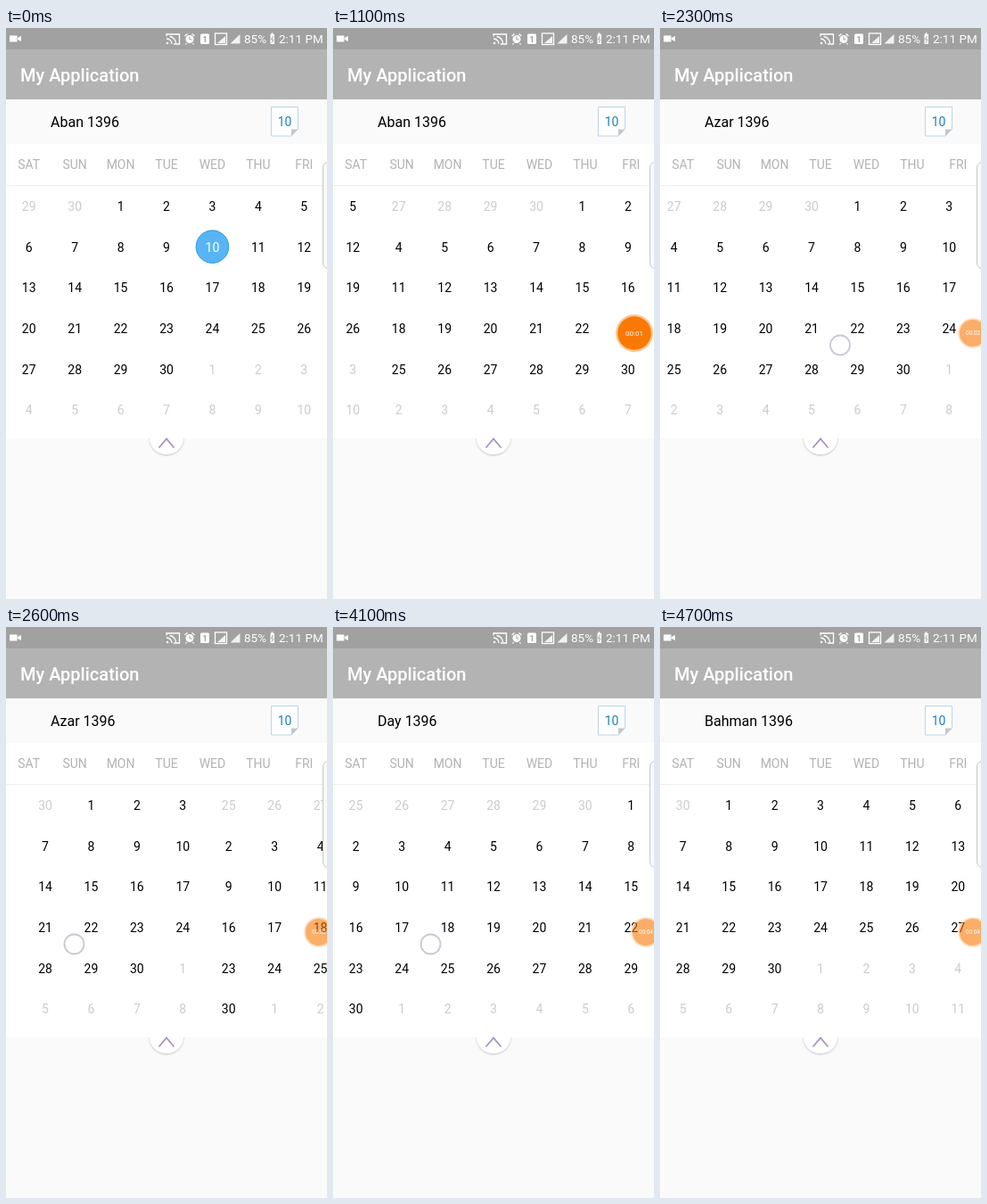
An HTML page that plays this animation: 360 by 640 pixels, repeating every 5 s.

```html
<!DOCTYPE html>
<html lang="en">
<head>
<meta charset="utf-8">
<title>Month calendar</title>
<style>
  html, body { margin: 0; width: 100%; height: 100%; overflow: hidden; background: #fafafa; }
  svg { display: block; width: 100%; height: 100%; font-family: Roboto, sans-serif; }
  .mid { text-anchor: middle; }
</style>
</head>
<body>
<svg viewBox="0 0 360 640">
  <defs>
    <filter id="soft" x="-30%" y="-30%" width="160%" height="160%">
      <feDropShadow dx="0" dy="1" stdDeviation="1" flood-opacity=".25"/>
    </filter>
  </defs>
  <rect width="360" height="640" fill="#fafafa"/>

  <!-- collapse tab -->
  <circle cx="180" cy="459" r="19" fill="#fff" filter="url(#soft)"/>
  <rect y="130" width="360" height="330" fill="#fff"/>
  <path d="M171.500 470.500L180 460.500L188.500 470.500" fill="none" stroke="#a994c4" stroke-width="1.800"/>

  <g id="weekdays" class="mid" font-size="14" fill="#b3b3b3"></g>
  <path d="M0 176.500H356" stroke="#eee"/>
  <g id="strip" class="mid" font-size="14"></g>

  <!-- title bar and status bar -->
  <rect width="360" height="24" fill="#a1a1a1"/>
  <rect y="24" width="360" height="56" fill="#b3b3b3"/>
  <text x="16" y="59.500" font-size="20" font-weight="500" fill="#fff">My Application</text>
  <g fill="#fff">
    <path d="M4 8.500h8.500v7H4zM13 11l4-2v6l-4-2z"/>
    <rect x="218" y="6.500" width="10" height="11.500" rx="1.500"/>
    <path d="M246 9v8h-9zM262.500 7v10.500h-11z" fill-opacity=".85"/>
    <path d="M296.500 7h1v-1.500h2V7h1.500v11h-4.500z"/>
    <circle cx="206" cy="12.500" r="4.500"/>
    <circle cx="181" cy="17" r="1.300"/>
    <text x="267" y="17" font-size="13.500">85%</text>
    <text x="306" y="17" font-size="13.500">2:11 PM</text>
  </g>
  <g fill="none" stroke="#fff" stroke-width="1.300">
    <path d="M180 9.500V7h14.500v11H188M180 12a6 6 0 0 1 6 6M183.500 9.500a8 8 0 0 1 7 7.500"/>
    <rect x="234.500" y="6" width="13" height="12.500"/>
    <path d="M200.500 9l3-2.500M211.500 9l-3-2.500M202.500 17l-1 1.500M209.500 17l1 1.500"/>
  </g>
  <path d="M206 9.500v3.500h2.500M299.500 9l-2 4h2.500l-2 3.500" fill="none" stroke="#a1a1a1"/>
  <text class="mid" x="223" y="15.800" font-size="9" font-weight="700" fill="#a1a1a1">1</text>

  <!-- month heading and today button -->
  <text id="month" x="50" y="110.500" font-size="16"></text>
  <path d="M297.500 88.500H327.500V113L320 121H297.500Z" fill="#fff" stroke="#bcd6e4"/>
  <path d="M320 113.500h7.500l-7.500 7.500z" fill="#c4c8ca"/>
  <text class="mid" x="312.500" y="109.500" font-size="14" fill="#1a80c0">10</text>

  <!-- edge handle -->
  <path d="M361 150.500Q355.500 151 355.500 157V263Q355.500 269 361 269.500Z" fill="#f9f9f9" stroke="#c8c8c8"/>

  <g id="recorder">
    <circle r="21" fill="#fbc892"/>
    <circle r="18.800" fill="#f97904"/>
    <text id="clock" class="mid" y="2.800" font-size="8" fill="#fff"></text>
  </g>
  <circle id="touch" r="11" fill="#fff" fill-opacity=".65" stroke="#c9c9d4" stroke-width="1.800"/>
</svg>

<script>
const $ = id => document.getElementById(id);
const LOOP = 5000, STEP = 100, WIDTH = 360, COLUMN = WIDTH / 7, ROW = 45.67;

const months = [
  { name: 'Aban', firstColumn: 2, from: 0, selected: 10 },
  { name: 'Azar', firstColumn: 4, from: 1600 },
  { name: 'Day', firstColumn: 6, from: 3200 },
  { name: 'Bahman', firstColumn: 1, from: 4700 }
];

// Keys are [time in ms, value].
const scrollKeys = [
  [700, 0], [800, 25], [900, 100], [1000, 235], [1100, 312], [1200, 343], [1300, 356], [1400, 360],
  [2200, 360], [2300, 370], [2600, 496], [2700, 702], [2800, 714], [2900, 719], [3000, 720],
  [4100, 720], [4200, 785], [4300, 970], [4400, 1063], [4500, 1080]
];
const touches = [
  [[700, 240], [800, 210], [900, 135]],
  [[2200, 224], [2300, 202], [2600, 76.5]],
  [[4100, 109.5], [4200, 45]]
];
const clockTicks = [900, 2200, 2900, 4100];

function sample(keys, t) {
  const next = keys.findIndex(([time]) => time > t);
  if (next === 0) return keys[0][1];
  if (next < 0) return keys[keys.length - 1][1];
  const [t0, a] = keys[next - 1], [t1, b] = keys[next];
  return a + (b - a) * (t - t0) / (t1 - t0);
}

function add(parent, tag, attributes, text = '') {
  const node = document.createElementNS('http://www.w3.org/2000/svg', tag);
  for (const key in attributes) node.setAttribute(key, attributes[key]);
  node.textContent = text;
  parent.append(node);
}

const columnX = column => (column + 0.5) * COLUMN;

function buildMonth({ firstColumn, selected }, page) {
  for (let cell = 0; cell < 42; cell++) {
    const index = cell - firstColumn;
    const day = (index + 30) % 30 + 1;
    const inMonth = index >= 0 && index < 30;
    const isSelected = inMonth && day === selected;
    const x = page * WIDTH + columnX(cell % 7);
    const y = 200 + Math.floor(cell / 7) * ROW;
    if (isSelected) add($('strip'), 'circle', { cx: x, cy: y - 0.5, r: 18.3, fill: '#58b5f5', stroke: '#2b98e0' });
    add($('strip'), 'text', { x, y: y + 5, fill: isSelected ? '#fff' : inMonth ? '#000' : '#ccc' }, day);
  }
}

['SAT', 'SUN', 'MON', 'TUE', 'WED', 'THU', 'FRI'].forEach((name, column) =>
  add($('weekdays'), 'text', { x: columnX(column), y: 157.5 }, name));
months.forEach(buildMonth);

function draw(now) {
  const t = Math.floor(now % LOOP / STEP) * STEP;
  $('strip').setAttribute('transform', `translate(${-sample(scrollKeys, t)} 0)`);
  $('month').textContent = months.filter(month => t >= month.from).pop().name + ' 1396';

  const docked = t >= 2300;
  const recorder = $('recorder');
  recorder.setAttribute('transform', docked ? 'translate(351 342) scale(.8)' : 'translate(338 342)');
  recorder.setAttribute('opacity', t < 300 ? 0 : docked ? 0.6 : 1);
  $('clock').textContent = '00:0' + clockTicks.filter(tick => t >= tick).length;

  const path = touches.find(keys => t >= keys[0][0] && t <= keys[keys.length - 1][0]);
  $('touch').setAttribute('visibility', path ? 'visible' : 'hidden');
  if (path) $('touch').setAttribute('transform', `translate(${sample(path, t)} 355.500)`);
}

const start = performance.now();
function tick() {
  draw(performance.now() - start);
  requestAnimationFrame(tick);
}
tick();
</script>
</body>
</html>
```
